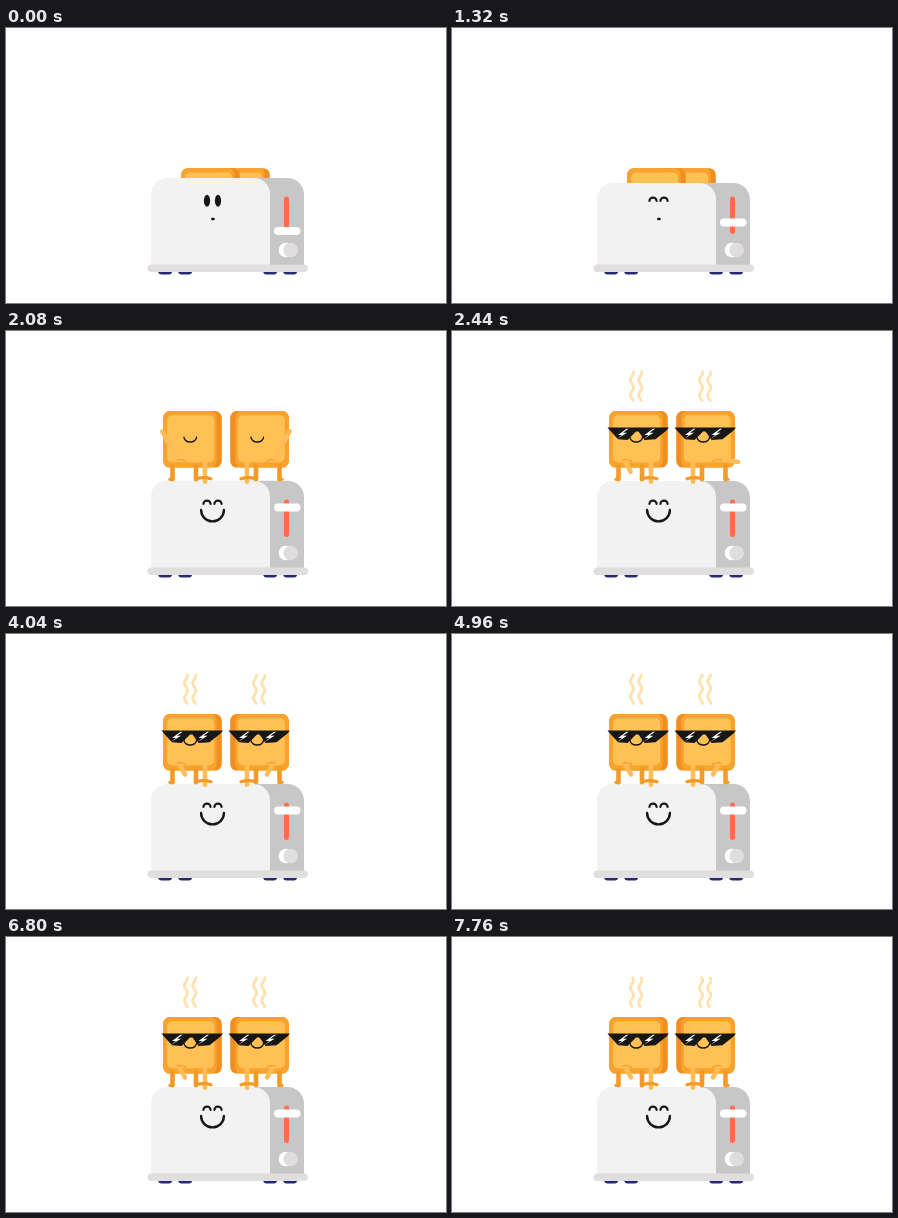
An HTML page for the animation above (7800 ms loop, 440x275 px).

```html
<!DOCTYPE html>
<html lang="en">
<head>
<meta charset="utf-8">
<title>Cool toast</title>
<style>
  html, body { margin: 0; width: 100%; height: 100%; overflow: hidden; background: #fff; }
  svg { display: block; width: 100vw; height: 100vh; }
</style>
</head>
<body>
<svg id="stage" viewBox="0 0 440 275"></svg>
<script>
const LOOP = 7800, STEP = 40, TAU = Math.PI * 2;
const POP = 1320, LAUNCH = 1360, PEAK = 1665, LAND = 2000;
const SLOT_Y = 168.5, REST_Y = 108.3;
const INK = '#171717', CRUST = '#f08f1f', RIM = '#f8a32e', CRUMB = '#ffc154';
const LEG = '#f39a29', ARM = '#fcbd58';
const stage = document.getElementById('stage');

const clamp = v => Math.max(0, Math.min(1, v));
const mix = (a, b, k) => a + (b - a) * k;
const smooth = (t, from, length) => {
  const k = clamp((t - from) / length);
  return k * k * (3 - 2 * k);
};
// Damped spring that starts at its full size
const spring = (t, from, size, fade) =>
  t < from ? 0 : size * Math.exp((from - t) / fade) * Math.cos((t - from) / 36);

const box = (x, y, w, h, r, fill) =>
  `<rect x="${x}" y="${y}" width="${w}" height="${h}" rx="${r}" fill="${fill}"/>`;
const oval = (x, y, rx, ry, fill) =>
  `<ellipse cx="${x}" cy="${y}" rx="${rx}" ry="${ry}" fill="${fill}"/>`;
const shape = (d, fill) => `<path d="${d}" fill="${fill}"/>`;
const line = (d, color, w) =>
  `<path d="${d}" fill="none" stroke="${color}" stroke-width="${w}" stroke-linecap="round" stroke-linejoin="round"/>`;
const group = (transform, body) => `<g transform="${transform}">${body}</g>`;

function toasterFace(t) {
  const shut = (t >= POP && t < 1440) || t >= 1960;
  const eyes = [201, 212].map(x => shut
    ? line(`M${x - 3.6} 173a3.6 3.4 0 0 1 7.2 0`, INK, 2.1)
    : oval(x, 172.8, 3.1, 6, INK)).join('');
  const grin = smooth(t, 1400, 120);
  if (!grin) return eyes + box(205, 189.8, 3.8, 2.4, 1.2, INK);
  const w = mix(2, 11.4, grin);
  return eyes + line(`M${206.5 - w} 179a${w} ${w} 0 0 0 ${2 * w} 0`, INK, 2.4);
}

function toaster(t) {
  const top = 150 + spring(t, POP, 5, 90) + spring(t, LAND, 3, 50);
  const lever = t < POP ? 203 : 176.5 + 18 * Math.exp((POP - t) / 70);
  const feet = [152, 172, 257, 277].map(x =>
    shape(`M${x} 243h14.3q-.5 3.5-3.5 3.5h-7.3q-3 0-3.5-3.5z`, '#262a72')).join('');
  return feet +
    shape(`M245 ${top}H281.5a16.5 16.5 0 0 1 16.5 16.5V238H245z`, '#c7c7c7') +
    shape(`M145 238V${top + 16}a16 16 0 0 1 16-16H248a16 16 0 0 1 16 16V238z`, '#f2f2f2') +
    box(141.5, 236.5, 160.5, 7.5, 3.7, '#e0dede') +
    box(278, 168.5, 5, 37.5, 2.5, '#ff6d4a') +
    box(268, lever - 4, 26.5, 8, 4, '#fff') +
    oval(280, 222, 7.3, 7.3, '#fff') + oval(284.7, 222, 7.3, 7.3, '#dfdddd') +
    toasterFace(t);
}

const slices = [
  { flip: 1, slotX: 204.5, restX: 186.5, peakY: 40, turns: 2, ease: .85, delay: 0 },
  { flip: -1, slotX: 234.5, restX: 253.5, peakY: 21, turns: 1, ease: .68, delay: 200 }
];

// Seated: hangs from (x, y). In the air: centred at airX, circling with the spin.
const limbs = [
  { x: -20, y: 27, len: 13, airX: -2, up: 30, out: 14, half: 13, color: LEG },
  { x: 3.5, y: 27, len: 13, airX: 8, up: -15, out: -40, half: 6, color: LEG },
  { x: -14.5, y: 20, len: 14, airX: -12, up: -20, out: -8, half: 7, color: ARM, swings: true },
  { x: 12.5, y: 24, len: 18.5, airX: 13, up: -34, out: -24, half: 7, color: ARM }
];

function limb(t, l, turn, delay) {
  const grown = smooth(t, 1420, 160), seated = smooth(t, 1860, 140);
  if (!grown) return '';
  const swing = l.swings ? smooth(t, 2080 + delay, 380) : 1;
  const angle = mix(4.2, l.swings ? 1.05 : TAU / 4, swing);
  const reach = l.len + 18 * (1 - swing) ** 3;
  const mid = l.up * Math.cos(turn) + l.out * Math.sin(turn);
  const x1 = mix(l.airX, l.x, seated);
  const y1 = mix(mid - l.half * grown, l.y, seated);
  const x2 = mix(l.airX, l.x + reach * Math.cos(angle), seated);
  const y2 = mix(mid + l.half * grown, l.y + reach * Math.sin(angle), seated);
  return line(`M${x1} ${y1}L${x2} ${y2}`, l.color, 4.6);
}

// Bread turning about its horizontal axis; the cut edge shows on the far side
function slab(turn) {
  const c = Math.cos(turn), lift = -5 * Math.sin(turn);
  const h = Math.max(.04, Math.abs(c));
  const half = 28.3 * h + Math.abs(lift);
  return box(-29.3, -half, 58.6, 2 * half, Math.min(6.5, half), CRUST) +
    group(`translate(0 ${lift}) scale(1 ${h})`,
      box(-29.3, -28.3, 53.5, 56.6, 6.5, c < 0 ? CRUST : RIM) +
      box(-25.3, -24, 47, 47, 5, CRUMB));
}

function shades(drop) {
  const bolt = x => shape(`M${x + 9.5} 97.8L${x + 1} 104h4L${x} 108l10-6.2h-4l5.5-4z`, '#fff');
  return group(`translate(0 ${drop})`,
    shape('M155.5 96.5H217L214.5 99.5 203.5 108.3 192.5 109 186.5 100.5H184L175.5 109 166 108.3 158 99.5z', INK) +
    bolt(165) + bolt(191.5));
}

function slice(t, o) {
  const u = clamp((t - LAUNCH) / (LAND - LAUNCH));
  const turn = TAU * o.turns * u ** o.ease;
  const x = mix(o.restX, o.slotX, (1 - u) ** 2);
  const y = t < PEAK
    ? mix(o.peakY, SLOT_Y, clamp((PEAK - t) / (PEAK - LAUNCH)) ** 2)
    : mix(o.peakY, REST_Y, clamp((t - PEAK) / (LAND - PEAK)) ** 2);
  let body = slab(turn) + limbs.map(l => limb(t, l, turn, o.delay)).join('');
  if (t >= LAND) {
    body += line('M3.5 39.5q8-2.5 15 0', LEG, 3.2) + line('M-20 40H-22.5', LEG, 3.2) +
      line('M-15 21q4-2 8 1', LEG, 1.2);
  }
  const flip = u > 0 ? o.flip : 1;
  let out = group(`translate(${x} ${y}) scale(${flip} 1)`, body);

  const front = Math.cos(turn);
  if (u > 0 && front > .1) {
    out += group(`translate(${x} ${y - 5 * Math.sin(turn)}) scale(1 ${front})`,
      line('M-8.5 -2a6 4.5 0 0 0 12.5 0', INK, 1.4));
  }
  if (t >= 2120) {
    out += group(`translate(${o.restX - 186.5} 0)`, shades(-18 * (1 - smooth(t, 2120, 160))));
  }
  return out;
}

function steam(t) {
  const rise = smooth(t, 2200, 200);
  if (!rise) return '';
  const phase = 2.9 + .9 * Math.sin(TAU * (t - 2440) / 800);
  const top = mix(70, 41, rise);
  return [180, 188.3, 249, 257.3].map(x => {
    const points = [];
    for (let y = top; y <= 70.5; y += 1.5) {
      points.push(`${x - 1.6 * Math.cos((y - 41) / 15 * TAU + phase)} ${y}`);
    }
    return line('M' + points.join('L'), '#fde3b2', 3);
  }).join('');
}

function draw(t) {
  const toast = slice(t, slices[1]) + slice(t, slices[0]);
  stage.innerHTML = (t < PEAK ? toast + toaster(t) : toaster(t) + toast) + steam(t);
}

const start = performance.now();
function tick(now) {
  const t = Math.max(0, now - start) % LOOP;
  draw(Math.floor(t / STEP) * STEP);
  requestAnimationFrame(tick);
}
draw(0);
requestAnimationFrame(tick);
</script>
</body>
</html>
```
